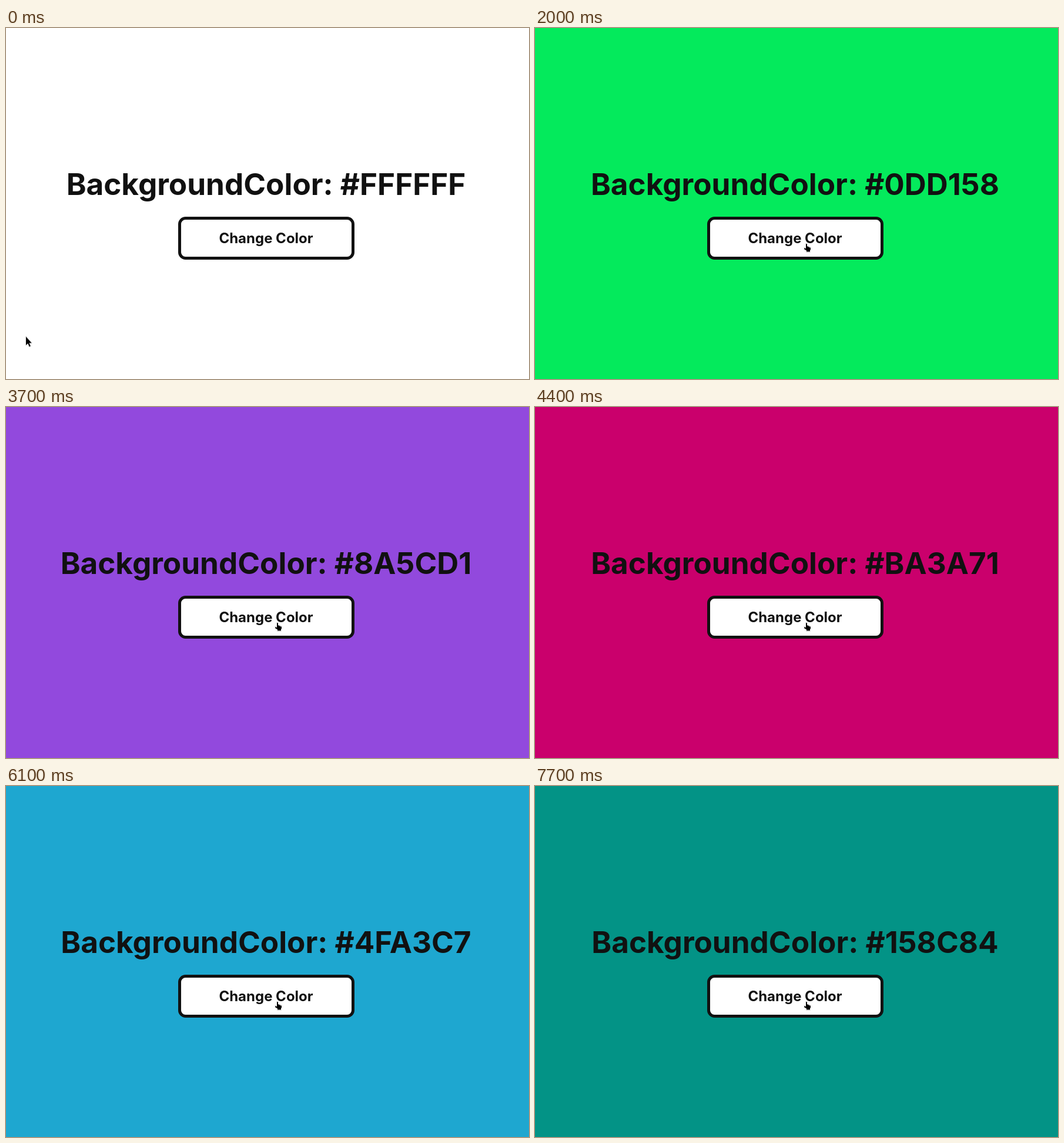
Recreate the animation shown at these times as an HTML page. Size 890 by 597 pixels, loop 8 s.

```html
<!DOCTYPE html>
<html lang="en">
<head>
<meta charset="utf-8">
<title>Background color changer</title>
<style>
  html, body { margin: 0; width: 100%; height: 100%; overflow: hidden; }
  svg { display: block; width: 890px; height: 597px; }
  text { font-family: Inter, sans-serif; font-weight: 700; text-anchor: middle; fill: #111; }
  .cursor { fill: #000; stroke: #fff; stroke-linejoin: round; paint-order: stroke; filter: drop-shadow(0 .5px .5px #0008); }
</style>
</head>
<body>
<svg viewBox="0 0 890 597">
  <rect id="background" width="890" height="597"/>
  <text id="label" x="442.5" y="284" font-size="51.2"></text>
  <rect x="295.5" y="323.5" width="295" height="68" rx="10" fill="#fff" stroke="#111" stroke-width="5"/>
  <text x="442.5" y="366" font-size="24">Change Color</text>
  <path id="arrow" class="cursor" stroke-width="1.5" d="M0 0V14.5L3.3 11.4L5.7 17L7.8 16.1L5.4 10.7H9.6Z"/>
  <path id="hand" class="cursor" stroke-width="2" d="M461 368Q461 367 462 367T463 368V371.5H465V372.5H467V373.5H469V377L468 378V380.5H462V378.5L458 376V374.5H460L461 375.5Z"/>
</svg>
<script>
const LOOP = 8000;

// start time, label, painted color
const colors = [
  [0, "#FFFFFF", "#ffffff"],
  [2000, "#0DD158", "#04ea5c"],
  [2800, "#E3772C", "#f0720e"],
  [3700, "#8A5CD1", "#9249dd"],
  [4400, "#BA3A71", "#ca006c"],
  [5400, "#FF3FA7", "#ff00a0"],
  [6100, "#4FA3C7", "#1ea7d0"],
  [6900, "#869CF6", "#9185f8"],
  [7700, "#158C84", "#039386"],
];

// pointer path: time, x, y
const pointer = [
  [0, 34, 525],
  [200, 63, 505],
  [400, 63, 505],
  [1300, 460, 370],
];

const [background, label, arrow, hand] =
  ["background", "label", "arrow", "hand"].map(id => document.getElementById(id));

function pointerAt(time) {
  const next = pointer.findIndex(point => point[0] > time);
  if (next < 0) return pointer.at(-1).slice(1);
  const [t0, x0, y0] = pointer[next - 1];
  const [t1, x1, y1] = pointer[next];
  const part = (time - t0) / (t1 - t0);
  return [x0 + (x1 - x0) * part, y0 + (y1 - y0) * part].map(Math.round);
}

function draw() {
  const time = performance.now() % LOOP;
  const [, name, paint] = colors.findLast(color => color[0] <= time);
  background.setAttribute("fill", paint);
  const text = "BackgroundColor: " + name;
  if (label.textContent !== text) label.textContent = text;

  // The pointer moves in steps of 100 ms
  const [x, y] = pointerAt(Math.floor(time / 100) * 100);
  arrow.setAttribute("transform", `translate(${x} ${y})`);
  const hovering = time >= 1400;
  arrow.style.display = hovering ? "none" : "";
  hand.style.display = hovering ? "" : "none";
  requestAnimationFrame(draw);
}
draw();
</script>
</body>
</html>
```
